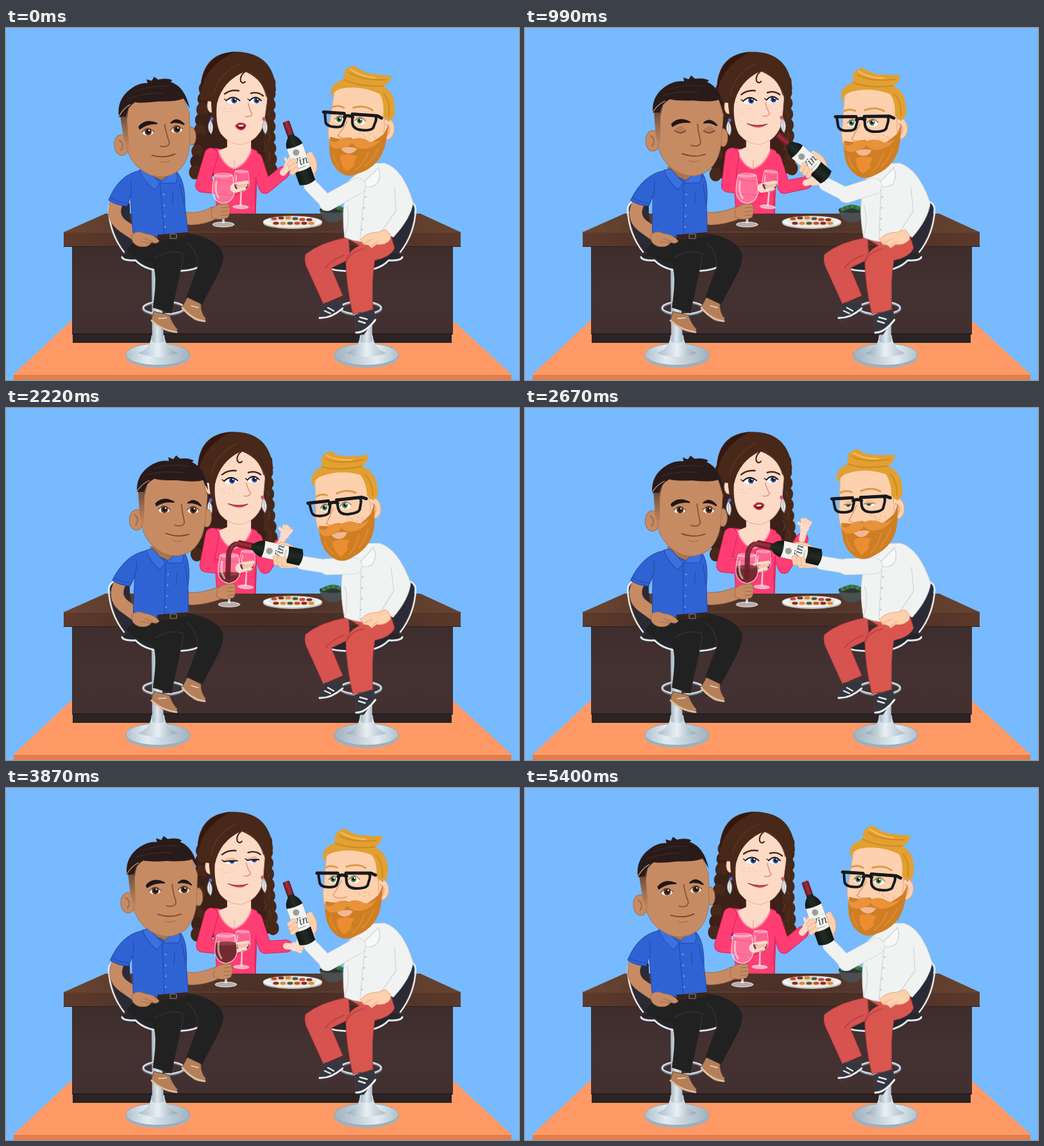
Animation of 800 by 550 pixels, one loop 5430 ms. Source, as an HTML page with a canvas:

```html
<!DOCTYPE html>
<html lang="en">
<head>
<meta charset="utf-8">
<title>At the bar</title>
<style>
html,body{margin:0;width:100%;height:100%;overflow:hidden;background:#77baff}
canvas{display:block}
</style>
</head>
<body>
<canvas id="stage" width="800" height="550"></canvas>
<script>
const c = document.getElementById('stage').getContext('2d');
const LOOP = 5430;
const TAN = '#c78b64', TAN_DK = '#a06a48', PALE = '#fddac6', PEACH = '#fdd0ae', PEACH_DK = '#e9a67e';
const PINK = '#ff3d73', PINK_DK = '#d92159', DARK = '#211717', BROWN = '#472819', WINE = '#6d1f2b';
c.lineCap = c.lineJoin = 'round';

// ---- drawing helpers ----
function paint(p, fill, line, w) {
  if (fill) { c.fillStyle = fill; c.fill(p); }
  if (line) { c.strokeStyle = line; c.lineWidth = w || 1; c.stroke(p); }
}
const path = (d, fill, line, w) => paint(new Path2D(d), fill, line, w);
function ring(x, y, rx, ry, rot = 0) {
  const p = new Path2D();
  p.ellipse(x, y, rx, ry, rot, 0, 7);
  return p;
}
const oval = (x, y, rx, ry, fill, line, w, rot) => paint(ring(x, y, rx, ry, rot), fill, line, w);
function box(x, y, w, h, r, fill, line, lw) {
  const p = new Path2D();
  p.roundRect(x, y, w, h, r);
  paint(p, fill, line, lw);
}
function grad(x0, y0, x1, y1, ...cols) {
  const g = c.createLinearGradient(x0, y0, x1, y1);
  cols.forEach((k, i) => g.addColorStop(i / (cols.length - 1), k));
  return g;
}
function group(fn) { c.save(); fn(); c.restore(); }
function pose(px, py, dx, dy, rot, fn) {
  group(() => {
    c.translate(px + dx, py + dy); c.rotate(rot); c.translate(-px, -py);
    fn();
  });
}
// positive k leans the part above base to the right
function lean(k, base, fn) {
  group(() => { c.transform(1, 0, -k, 1, k * base, 0); fn(); });
}
// eyeball with a lid that slides down by shut (0..1)
function eye(x, y, rx, ry, iris, r, look, lid, shut) {
  const ball = ring(x, y, rx, ry);
  group(() => {
    paint(ball, '#fff');
    c.clip(ball);
    oval(x + look, y - .5, r, r * 1.1, iris);
    oval(x + look, y - .5, r * .5, r * .6, '#12151f');
    oval(x + look + 1.5, y - 2.2, 1.2, 1.2, '#fff');
    c.fillStyle = lid;
    c.fillRect(x - rx, y - ry, rx * 2, ry * 2 * shut);
  });
  const lash = y - ry + ry * 1.6 * shut;
  return `M${x - rx} ${y + shut}Q${x} ${lash - ry * (1 - shut * 2)} ${x + rx} ${y + shut}`;
}

// ---- timing helpers ----
const ease = u => u * u * (3 - 2 * u);
const clamp = u => Math.min(1, Math.max(0, u));
function keys(t, ...list) {
  let i = 0;
  while (i < list.length - 2 && t > list[i + 1][0]) i++;
  const [a, b] = [list[i], list[i + 1]];
  const u = ease(clamp((t - a[0]) / (b[0] - a[0])));
  const v = a.slice(1).map((n, j) => n + (b[j + 1] - n) * u);
  return v.length > 1 ? v : v[0];
}
const blink = (t, ...mids) => Math.max(...mids.map(m => clamp(1.6 - Math.abs(t - m) / 65)));
const within = (t, ...spans) => spans.some(([a, b]) => t >= a && t < b);

// ---- room ----
function room() {
  c.fillStyle = '#77baff'; c.fillRect(0, 0, 800, 550);
  path('M103 456H696L788 541V550H12V541Z', '#ff9a66');
  path('M12 542H788V550H12Z', '#e27d4c');
}
function bar() {
  path('M103 340H697V479H103Z', grad(0, 340, 0, 479, '#3e2d2d', '#443132', '#423031'));
  path('M104 478H695V492H104Z', '#2c2324');
  path('M104 478H695', 0, '#241a1b', 1.5);
  path('M155 290H646L709 319H90Z', grad(90, 0, 709, 0, '#6b4532', '#54372b', '#4b3129', '#593a2c', '#67432f'));
  path('M90 319H709V342H90Z', grad(90, 0, 709, 0, '#5e3b2c', '#4b3027', '#472c25', '#4c3127', '#5b392a'));
  path('M90 319H709', 0, '#6b4735', 1);
  path('M90 341.5H709', 0, '#2f1f1c', 1);
}
function snacks() {
  oval(447, 305, 46, 9, '#b9bdc0');
  oval(447, 303, 46, 9, '#f2f3f3', '#c9cccd', 1);
  oval(447, 302, 37, 7, '#e3e5e5');
  const tint = ['#c84a35', '#4f5c43', '#d98b3c', '#7e2f33'];
  for (let i = 0; i < 12; i++) {
    const x = 418 + (i % 6) * 11 + (i > 5 ? 3 : 0), y = i > 5 ? 306 : 299 - Math.sin(i) * 1.5;
    oval(x, y, 5.5, 3, '#efd7a8');
    oval(x, y - 1, 4.5, 2.3, tint[(i * 3 + (i > 5)) % 4]);
  }
  path('M489 284Q493 303 510 304Q526 303 531 284Z', '#4a4f52');
  oval(510, 284, 21, 5, '#2f3437');
  for (let i = 0; i < 8; i++) oval(496 + i * 4, 283 - Math.sin(i * .45) * 4, 4, 3, i % 2 ? '#2f6b35' : '#3f8243');
}
function stool() {
  oval(237, 514, 50, 17, '#9fb1be');
  oval(237, 510, 50, 17, grad(187, 0, 287, 0, '#afc0cc', '#e3edf3', '#c0ced8', '#9fb2bf'), '#93a5b2', 1);
  path('M227 480Q226 500 206 508Q237 520 268 508Q248 500 247 480Z', grad(206, 0, 268, 0, '#a9bac6', '#e8f0f5', '#91a5b3'));
  path('M227 372H241L246 490Q237 495 228 490Z', grad(226, 0, 246, 0, '#9aacb9', '#dfe9ef', '#a5b7c3'));
  oval(246, 438, 32, 10, 0, '#8294a2', 4);
  oval(246, 437, 32, 10, 0, '#d7e2e9', 2);
  path('M187 265Q163 269 162 283Q164 320 188 352L212 348Q192 315 193 276Z', '#2a2b36');
  path('M187 265Q159 270 160 284Q162 322 184 350', 0, '#e4ebf0', 2.5);
  path('M180 356Q212 342 255 350L302 358Q303 377 262 380Q222 382 180 356Z', '#25262c');
  path('M181 358Q183 364 202 363Q220 382 262 380Q296 379 301 372', 0, '#dfe7ed', 3);
}

// ---- glass with optional wine, drawn around its stem ----
function glass(x, y, s, rot, fill, tint) {
  pose(x, y, 0, 0, rot, () => {
    c.translate(x, y); c.scale(s, s);
    const bowl = new Path2D('M-14 -22Q-18 -2 -17 6Q-14 20 0 22Q14 20 17 6Q18 -2 14 -22Z');
    c.fillStyle = tint; c.fill(bowl);
    if (fill > 0) group(() => {
      c.clip(bowl);
      const top = 22 - fill * 33;
      c.fillStyle = '#722c30'; c.fillRect(-20, top, 40, 50);
      oval(0, top, 17, 3, '#8b4143');
    });
    path('M-1.5 22L-2 53H2L1.5 22Z', 'rgba(238,236,240,.8)');
    oval(0, 55, 17, 4, 'rgba(240,238,242,.65)', 'rgba(255,255,255,.75)', 1);
    paint(bowl, 0, 'rgba(255,235,240,.75)', 1.2);
    oval(0, -22, 14, 3, 'rgba(255,255,255,.18)', 'rgba(255,240,245,.7)', 1);
    path('M-11 -12Q-14 5 -7 14', 0, 'rgba(255,255,255,.5)', 3);
  });
}

// ---- woman ----
function palm(x, y, a) {
  group(() => {
    c.translate(x, y); c.rotate(a);
    for (let i = -1; i < 3; i++) {
      const finger = `M0 ${i * 2}L${13 - Math.abs(i) * 1.5} ${i * 4.5 - 2}`;
      path(finger, 0, '#e5ad96', 5.5);
      path(finger, 0, PALE, 4.4);
    }
    path('M1 0L5 -11', 0, PALE, 4.5);
    oval(0, 0, 8, 7, PALE);
  });
}
function womanHead(t) {
  path('M327 118Q323 150 336 166Q350 183 368 182Q393 176 402 150L408 105Q400 72 372 66Q330 72 327 118Z', PALE, '#e3b5a0', 1);
  oval(320, 121, 6, 11, PALE, '#e0ad98', 1);
  path('M373 68Q338 82 329 118Q326 146 334 164Q320 148 320 115L303 112Q299 38 358 37Q418 38 421 98L408 114Q404 82 373 68Z', BROWN);
  path('M358 37Q304 40 303 104Q308 60 358 37Z', '#34170f');
  path('M373 68Q364 75 366 83Q369 88 373 84', 0, BROWN, 2.2);
  path('M378 68Q400 80 406 107M366 56Q333 69 324 102', 0, '#5c382a', 1.3);
  for (const x of [319, 404]) {
    oval(x + (x < 350 ? 2 : -2), 142, 2.5, 3, x < 350 ? '#4d6edb' : '#d95470');
    path(`M${x} 143Q${x - 8} 156 ${x + 1} 166Q${x + 7} 154 ${x} 143Z`, '#e9eaec', '#868991', 1);
    path(`M${x} 147V161`, 0, '#9fa2a8', 1);
  }
  const shut = blink(t, 3940);
  for (const [x, rx] of [[354, 10.5], [389, 9]]) {
    path(eye(x, 113.5, rx, 5, '#345da9', 4.6, 2, '#e9b7a4', shut), 0, '#231719', 2);
    path(`M${x - rx} ${113 + shut}l-3 -2`, 0, '#231719', 1.4);
  }
  path('M341 103Q350 96 363 98M382 102Q393 99 401 106', 0, BROWN, 2.4);
  path('M378 118Q380 128 384 135Q380 140 373 138', 0, '#d78f7b', 1.4);
  for (let i = 0; i < 8; i++) oval(337 + (i * 7) % 23, 126 + (i * 5) % 10, .7, .7, '#e6ab91');
  if (within(t, [0, 180], [330, 480], [1320, 1440], [1620, 1770], [1920, 2070], [2310, 2460], [2580, 2760], [3000, 3150], [3330, 3450])) {
    path('M358 153Q364 147 367 149Q371 148 374 152Q372 159 366 159Q361 158 358 153Z', '#781629', '#cf3c4a', 1.8);
    path('M362 152Q368 150 371 152L369 154H363Z', '#fff');
  } else {
    path('M348 149Q363 154 379 151Q372 157 363 155.5Q355 154 348 149Z', '#d74b57');
    path('M348 149Q363 155 379 151', 0, '#8f2935', 1.2);
  }
}
function woman(t) {
  const [rot, dx, dy] = keys(t, [0, 0, 0, 0], [900, -.05, 0, 0], [3990, -.055, 0, 0], [4560, .075, 0, 3], [5130, 0, 0, 0], [5430, 0, 0, 0]);
  const w = keys(t, [0, 0], [900, 1], [1770, .95], [2670, .28], [3870, .1], [4500, 1], [5370, 0], [5430, 0]);
  const [wx, wy, hx, hy] = keys(t, [0, 432, 226, 441, 215], [990, 438, 242, 450, 239], [1710, 420, 226, 433, 210], [2670, 432, 205, 436, 187],
    [3870, 437, 247, 450, 248], [4560, 435, 245, 449, 242], [5340, 432, 226, 441, 215], [5430, 432, 226, 441, 215]);
  pose(360, 180, dx, dy, rot, () => {
    path('M330 55Q304 80 304 120L290 228Q310 238 340 225L400 230Q420 232 416 200L418 85Q400 50 330 55Z', '#3b2118');
    for (let i = 0; i < 9; i++) {
      oval(310 - i * 1.9, 95 + i * 16.3, 9.5, 11, i % 2 ? '#3b2118' : BROWN);
      oval(411 + Math.max(0, i - 5), 86 + i * 17, 9.5, 11, BROWN);
      path(`M${402 + i % 2 * 7} ${88 + i * 15}q6 7 0 15`, 0, '#5a3628', 1.3);
    }
  });
  const ex = 306 + w * 11;
  const reach = `M390 205L404 249L${wx} ${wy}`;
  path(reach, 0, PINK_DK, 20);
  path('M345 160V190L325 188Q318 206 326 240L329 292H389L391 240Q401 215 391 192L382 188V160Z', PINK, PINK_DK, 1);
  path('M345 158V186L331 192Q338 214 355 220Q372 216 382 193V162Z', PALE);
  path('M345 168Q360 186 382 176L380 162Z', '#edbda6');
  path('M331 191Q338 214 355 220Q372 216 382 193', 0, '#ff8aa8', 2);
  path('M356 207Q357 214 355 220', 0, '#e4ab96', 1.3);
  path(reach, 0, PINK, 18);
  path('M390 232Q387 264 389 290', 0, PINK_DK, 1.2);
  path(`M${wx} ${wy}L${hx} ${hy}`, 0, PALE, 10);
  palm(hx, hy, Math.atan2(hy - wy, hx - wx));
  pose(360, 180, dx, dy, rot, () => womanHead(t));
  const arm = `M${320 + w * 3} 198L${ex} 246L${355 + w * 10} 251`;
  path(arm, 0, PINK_DK, 22);
  path(arm, 0, PINK, 20);
  const gx = 367 + w * 15;
  path(`M${357 + w * 13} 250L${gx - 2} 248`, 0, PALE, 15);
  glass(gx, 240, .72, .03 + .06 * w, .42, 'rgba(255,170,195,.35)');
  for (let i = 0; i < 3; i++) path(`M${gx - 5} ${243 + i * 5}L${gx + 9 - i * 2} ${241 + i * 5}`, 0, i % 2 ? '#f1c2ad' : PALE, 5);
}

// ---- man in the blue shirt ----
function blueHead(t) {
  oval(199, 176, 11, 16, TAN, TAN_DK, 1);
  path('M196 168Q205 174 198 184', 0, TAN_DK, 2);
  oval(309, 171, 7, 14, TAN, TAN_DK, 1);
  path('M206 128L207 182Q212 210 238 225Q262 238 286 222Q303 207 306 178L309 136L301 108H228Z', TAN, '#a87350', 1);
  path('M201 130Q208 118 216 116L211 138L211 186Q205 182 203 160Z', grad(0, 122, 0, 186, '#5d4032', '#9a6c50', TAN));
  path('M199 132Q197 104 222 89Q236 81 248 83L247 77L255 80L259 74L265 79Q280 77 287 82L284 84Q306 94 310 128L302 112Q290 116 262 113Q236 114 226 111Q213 117 210 132Z', '#2a1b1b');
  path('M226 95Q253 86 279 91M215 105Q245 97 270 101', 0, '#3d2b2b', 1.2);
  path('M199 131Q207 119 218 114', 0, '#c79c7e', 1.2);
  const shut = blink(t, 990, 4630);
  for (const x of [242, 287]) path(eye(x, 159, 9, 5.4, '#5a331c', 5.5, .5, '#b67b57', shut), 0, '#6d4029', 1.5);
  path('M229 150Q240 138 257 147Q242 145 230 153ZM279 148Q289 139 299 152Q288 146 279 148Z', DARK, DARK, 2.2);
  path('M269 150Q270 163 274 178Q272 187 259 183', 0, '#8f5836', 2);
  path('M245 196Q264 203 281 197', 0, '#7a4431', 1.8);
  path('M256 207Q264 210 271 207', 0, '#a87150', 1.3);
}
function shoe(d, sole, fill, tint) {
  path(d, fill, '#4d3c35', 1);
  path(sole, 0, tint, 3);
}
function blueMan(t, p, fill) {
  path('M197 337L284 321Q326 327 338 351Q341 364 330 386L306 432L281 421L299 373L273 376L258 446L229 437Q238 378 226 366Q193 360 188 345Z', '#222121');
  path('M232 359Q258 345 276 352Q277 365 272 377M283 336Q300 350 299 374', 0, '#353333', 1.2);
  shoe('M231 443L255 449Q260 463 268 471Q264 478 246 472L227 456Z', 'M227 457Q244 473 266 475', '#b58059', '#dfbd9d');
  shoe('M283 421L304 431Q304 446 312 454Q308 463 293 456L275 436Z', 'M275 437Q290 456 310 458', '#b58059', '#dfbd9d');
  path('M238 454L250 453M289 434L300 437', 0, '#efd6bf', 1.5);
  const gx = 339 + 8.5 * p;
  const fore = `M272 296Q300 302 ${gx - 15} 289`;
  path(fore, 0, TAN_DK, 20);
  path(fore, 0, TAN, 18);
  glass(gx, 252, 1, 0, fill, 'rgba(255,220,230,.32)');
  path(`M${gx - 18} 282Q${gx - 8} 273 ${gx + 8} 275Q${gx + 13} 285 ${gx + 7} 296Q${gx - 8} 302 ${gx - 19} 295Z`, TAN, TAN_DK, 1);
  for (let i = 0; i < 3; i++) path(`M${gx - 3} ${281 + i * 6}L${gx + 9 - i} ${280 + i * 6}`, 0, TAN_DK, 1);
  lean(.1 * p, 325, () => {
    const arm = 'M173 272Q163 295 182 309L210 328';
    path(arm, 0, TAN_DK, 20);
    path(arm, 0, TAN, 18.5);
    path('M213 216L214 230L240 243L257 230V214Z', '#a9734f');
    path('M208 223Q176 229 160 269Q173 278 189 278L194 263L198 320Q240 333 284 320L279 278Q280 238 265 223L247 240Z', '#2f63d4', '#2349a8', 1);
    path('M208 222L218 220L240 242L232 253Q214 238 208 222ZM240 242L261 222Q271 229 265 242Z', '#3b70e0', '#2349a8', 1);
    path('M240 243L247 324M194 263Q197 248 194 240M162 265Q175 273 190 273M260 256V276M271 244L278 277', 0, '#244cad', 1.2);
    for (let i = 0; i < 4; i++) oval(246 + i * .8, 260 + i * 17, 1.3, 1.3, '#7f9eea');
  });
  path('M236 323L284 319V326L238 332Z', '#33241f');
  box(256, 322, 10, 7, 1, 0, '#8f7f6c', 1.2);
  path('M196 324Q203 315 216 321Q232 323 239 333Q236 338 227 335Q222 344 207 341Q195 337 196 324Z', TAN, TAN_DK, 1);
  path('M211 334L225 336M216 329L229 334', 0, TAN_DK, 1);
  pose(255, 225, -15 + 17.6 * p, 2 - 2 * p, -.087 + .1 * p, () => blueHead(t));
}

// ---- man with the beard ----
function beardHead(t, look) {
  oval(585, 158, 11, 16, PEACH, PEACH_DK, 1);
  path('M583 151Q592 155 585 168', 0, PEACH_DK, 2);
  path('M499 102L495 150Q489 180 505 195L560 205Q582 192 580 150L576 100Q540 82 499 102Z', PEACH, PEACH_DK, 1);
  path('M494 114Q489 92 512 85Q509 67 524 63Q531 62 534 67Q548 74 561 73Q574 75 586 74Q584 87 574 91Q598 102 594 138L586 146L577 138Q578 116 570 104Q540 92 512 99Q499 101 494 114Z', '#e2a032');
  path('M512 85Q536 95 574 91M520 74Q541 85 577 81M576 104Q587 113 586 138', 0, '#cc8a24', 2);
  path('M521 68Q538 79 560 79', 0, '#f1bb58', 2.5);
  group(() => {
    c.translate(0, look);
    path('M498 129Q506 125 515 129M530 128Q547 122 560 130', 0, '#dc9a4c', 3);
    const shut = blink(t, 300, 2740, 4560);
    for (const [x, rx] of [[510, 7.5], [542, 8.5]]) path(eye(x, 148, rx, 5.6, '#579568', 4.6, -1, '#f3bb96', shut), 0, '#a0694a', 1.4);
    path('M522 150Q514 165 509 173Q517 180 530 175', PEACH, '#dc9369', 1.4);
    for (let i = 0; i < 7; i++) oval(543 + (i * 8) % 26, 167 + (i * 5) % 9, .9, .9, '#e8a07a');
    path('M486 138H514Q519 138 518 146L515 156Q513 160 503 160Q489 160 488 152Z', 0, '#17181b', 4);
    path('M529 138H563Q568 139 566 147L563 157Q560 162 546 162Q532 162 530 152Z', 0, '#17181b', 4);
    path('M517 143Q523 139 530 143M484 138H516M529 138H568L575 141', 0, '#17181b', 5);
  });
  path('M587 150L580 166Q571 174 560 181Q549 171 537 179Q527 172 514 178Q506 178 497 176Q494 213 513 228Q527 240 545 230Q579 216 584 180Z', '#cf7e24');
  path('M515 192Q527 188 540 191Q536 200 526 200Q517 198 515 192Z', '#f0b793');
  path('M531 178Q519 172 510 181Q503 187 496 180Q498 197 513 193Q527 191 531 183Q542 194 555 190Q570 186 577 174Q566 182 556 178Q542 171 531 178Z', '#e8923a');
  path('M515 204Q528 198 542 204Q535 212 538 218Q531 224 526 228Q515 219 515 204Z', '#ea8e31');
  path('M558 196Q553 214 540 225M573 189Q566 207 555 217M504 201Q505 213 514 221', 0, '#dd8c33', 2);
}
function bottle(x, y, rot, pour) {
  group(() => {
    c.translate(x, y); c.rotate(rot);
    const px = 15 - 7 * pour;
    oval(px, 22, 9, 17, PEACH, PEACH_DK, 1, .15);
    path(`M${px + 1} 22L${px + 4} 8`, 0, PEACH, 7);
    path('M-5 -35L-5.5 -28Q-13 -20 -13 -12V48Q0 54 13 48V-12Q13 -20 5.5 -28L5 -35Z', grad(-13, 0, 13, 0, '#0c1411', '#222b25', '#101714'));
    box(-5.5, -53, 11, 22, 2, grad(-5, 0, 5, 0, '#641724', '#a32e3d', '#6d1a28'));
    path('M-13 -12Q0 -9 13 -12V26Q0 30 -13 26Z', '#f2f2ee');
    oval(-1, -2, 5, 5, '#9a9c9d');
    c.fillStyle = '#44484c';
    c.font = 'italic 16px "Noto Serif", "Liberation Serif", serif';
    c.textAlign = 'center';
    c.fillText('Vin', 0, 19);
    path('M-6 23H6', 0, '#a8aaaa', 1);
    for (let i = 0; i < 3; i++) {
      const finger = `M-17 ${12 + i * 7}L-9 ${9 + i * 7}`;
      path(finger, 0, PEACH_DK, 7.5);
      path(finger, 0, PEACH, 6.2);
    }
  });
}
function beardMan(t, pour) {
  const [rot, dx, dy, look] = keys(t, [0, .07, 5, -3, 0], [600, .07, 5, -3, 0], [1440, -.11, -4, 3, 1], [2250, -.11, -4, 3, 1], [2670, -.052, -1, 1, 0],
    [3420, 0, 1, 1, -6], [3990, 0, 1, 1, -6], [4560, -.06, -3, 7, 4], [5130, .07, 5, -3, 0], [5430, .07, 5, -3, 0]);
  const k = keys(t, [0, 0], [600, 0], [1170, -.07], [2300, -.07], [3150, 0], [5430, 0]);
  path('M534 327Q489 335 467 354Q464 365 471 378L495 431L525 418L507 375L536 361Z', '#d6534f', '#ae3b3f', 1);
  path('M528 326Q560 338 600 324L606 344Q600 358 575 363Q569 402 572 440L541 447Q531 405 530 366Q532 349 551 340Z', '#d9564f', '#ae3b3f', 1);
  path('M531 365Q536 350 558 345M498 375Q507 363 527 355', 0, '#b43f42', 1.4);
  shoe('M497 430L523 426L525 436Q513 449 492 458Q485 453 490 445Z', 'M489 453Q507 454 525 438', '#343640', '#f0f0f0');
  shoe('M545 448L573 440L577 454Q565 468 558 479Q546 480 545 470Z', 'M546 476Q561 476 576 456', '#343640', '#f0f0f0');
  path('M497 442L506 446M502 437L511 442M550 458L560 461M552 452L563 455', 0, '#e8e8e8', 2.4);
  lean(k, 330, () => {
    path('M535 238L566 212L590 211Q619 219 635 273Q631 298 604 327L588 318L586 331Q555 339 528 327Q523 285 530 258Z', '#f1f2f2', '#c9ced2', 1);
    path('M606 249L608 286L586 317M560 246L552 330M532 278Q537 300 529 324', 0, '#d3d7da', 1.3);
    path('M535 237L554 245L549 258Q537 252 535 237ZM554 245L581 218Q586 232 578 244Q566 252 554 245Z', '#f7f8f8', '#cdd2d6', 1.2);
    for (let i = 0; i < 4; i++) oval(561 - i * 2, 264 + i * 17, 1.2, 1.2, '#b8bec3');
  });
  path('M553 330Q563 319 580 319L592 315Q602 322 599 331Q591 340 578 338L570 344Q567 338 558 338Z', PEACH, PEACH_DK, 1);
  path('M571 330L559 336M580 333L570 341', 0, PEACH_DK, 1);
  const bx = 454 - 41 * pour, by = 196 + 27 * pour - 8 * Math.sin(pour * Math.PI), ang = -.34 - 1.01 * pour;
  const ey = 273 - 25 * pour, wx = 475 - 12 * pour, wy = 246 - 4 * pour;
  path(`M${bx + 20 - 2 * pour} ${by + 20}L${wx} ${wy}`, 0, PEACH, 14);
  const upper = `M${548 + k * 80} 247L501 ${ey}`, lower = `M501 ${ey}L${wx} ${wy}`;
  path(upper, 0, '#cdd2d6', 26);
  path(lower, 0, '#cdd2d6', 22);
  path(upper, 0, '#f1f2f2', 24.5);
  path(lower, 0, '#f1f2f2', 20.5);
  pose(540, 225, dx, dy, rot, () => beardHead(t, look));
  return () => bottle(bx, by, ang, pour);
}
function stream(t) {
  if (t < 1440 || t > 2910) return;
  const drop = keys(t, [1440, 0], [1590, 1], [2790, 1], [2910, 0]);
  group(() => {
    c.globalAlpha = .92;
    path(`M365 213Q350 210 347 ${218 + drop * 12}L346 ${220 + drop * 44}`, 0, WINE, 3 + 5 * drop);
    path(`M361 212Q352 212 349 ${221 + drop * 6}`, 0, '#93404a', 1.5);
  });
}

function draw(t) {
  const p = keys(t, [0, 0], [420, 0], [1200, 1.05], [2200, 1.05], [2670, .83], [3450, .92], [4290, 0], [5430, 0]);
  const fill = t < 1590 ? 0 : keys(t, [1590, .04], [1770, .12], [2670, .78], [2880, .94], [4700, .94], [5310, 0], [5430, 0]);
  const pour = keys(t, [0, 0], [600, 0], [1380, 1], [2820, 1], [3450, 0], [5430, 0]);
  room();
  woman(t);
  bar();
  snacks();
  stool();
  group(() => { c.translate(799, 0); c.scale(-1, 1); stool(); });
  blueMan(t, p, fill);
  const drawBottle = beardMan(t, pour);
  stream(t);
  drawBottle();
}
function tick() {
  draw(Math.floor(performance.now() % LOOP / 30) * 30);
  requestAnimationFrame(tick);
}
tick();
</script>
</body>
</html>
```
